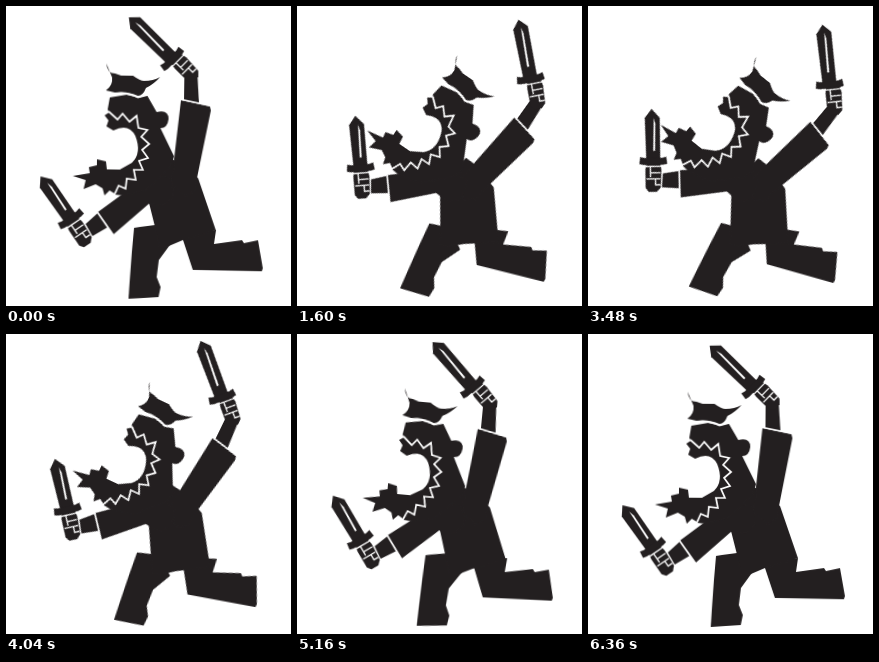
Recreate the animation shown at these times as an HTML page. Size 285x300 px, loop 6.4 s.

```html
<!DOCTYPE html>
<html lang="en">
<head>
<meta charset="utf-8">
<title>Dancing viking</title>
<style>
  html, body { margin: 0; width: 100%; height: 100%; overflow: hidden; background: #fff; }
  svg { display: block; width: 100%; height: 100%; fill: #231f20; }
  .cut { fill: none; stroke: #fff; stroke-width: 1.7; }
  .fine { stroke-width: 1.3; }
  .gap { fill: #fff; }
</style>
</head>
<body>
<svg viewBox="0 0 285 300">
  <defs>
    <!-- both are centred on the guard, blade pointing up -->
    <path id="guard" d="M-13-4L-9-3H9L13-4L14 3L10 4H-10L-14 3Z"/>
    <g id="fist">
      <path d="M-7 3H7L8 9L7 27L3 31L-5 31L-8 27L-8 9Z"/>
      <path class="cut fine" d="M-8 5.500H8M-3 6V16M-3 12H7M-7 18H7M2 18V24H7"/>
    </g>
  </defs>

  <g id="legBack">
    <path d="M175 228L187 264L256 265L257 262L252 234L238 237L236 234L208 238L210 224Z"/>
  </g>
  <g id="legFront">
    <path d="M134 221L149 219L166 236L153 254L151 271L155 281L153 291L123 293L124 276L126 246L128 222Z"/>
  </g>
  <g id="torso">
    <path d="M142 193L146 168L158 150L170 155L192 172L210 224L177 234L163 240L154 240Z"/>
  </g>

  <g id="armRight">
    <path d="M174 94L203 100L204 104L191 172L190 184L180 190L166 178L168 152Z"/>
    <path d="M177 70L190 68L192 97L177 94Z"/>
    <path class="cut" d="M172 93L205 99.500"/>
    <g transform="translate(164.500 53) rotate(-46)">
      <path d="M-1-60L7-52L7 0H-7L-8-51Z"/>
      <path class="gap" d="M0-52L1.500-46L1-12L-1-12Z"/>
      <use href="#guard"/>
      <use href="#fist" x="3"/>
    </g>
  </g>

  <g id="armLeft">
    <path d="M92 207L120 186L145 170L164 172L168 190L158 200L143 198L108 229Z"/>
    <path d="M80 219L93 207L102 222L87 231Z"/>
    <path class="cut" d="M90.500 205.500L108 230"/>
    <g transform="translate(65 214) rotate(-35)">
      <path d="M-1-52L7-43L7 0H-7L-8-43Z"/>
      <path class="gap" d="M1-43L2.500-37L2-10L0-10Z"/>
      <use href="#guard"/>
      <use href="#fist"/>
    </g>
  </g>

  <g id="head">
    <path d="M103 92L120 89L132 92L140 89L150 106Q162 103 162 113Q161 122 154 122L168 150L165 160L140 185L118 190L109 189L120 176L135 150L133 123L104 110L101 104Z"/>
    <path d="M99 58Q100 68 108 68L114 70L126 70Q133 75 137 75Q146 75 153 71Q147 78 139 82Q136 90 131 90Q120 85 108 87L99 85Q106 80 105 72Z"/>
    <path class="cut" d="M98 87.500L108 88Q120 86.500 131 91.500L141 89"/>
    <path d="M104 106L98 110L102 115L100 121L107 125Q122 117 129 130Q136 147 126 157L114 164L101 164L100 156L91 154L91 160L83 162L84 168L67 171L80 175L78 184L90 179L97 183L99 190L104 185L109 188L122 177L134 160L140 148L139 130L130 113Z"/>
    <path class="cut" d="M102 106L111 114L116 108L123 116L130 110L132 122L141 124L135 131L143 138L136 144L142 152L133 155L137 164L128 164L130 174L121 173L120 183L113 180L108 191"/>
  </g>
</svg>
<script>
// id: [pivot x, y at start, pivot x, y at end, turn in degrees]
const joints = {
  legBack: [205, 230, 205, 230, 17],
  legFront: [143, 232, 143, 232, 26],
  torso: [156, 196, 156, 196, 18],
  armRight: [183, 170, 180, 181, 45.500],
  armLeft: [155, 190, 153, 185, 38.800],
  head: [144, 153, 144, 153, 44]
};

const easing = "cubic-bezier(.25, .15, .38, 1)";
const loop = { duration: 6400, delay: -80, iterations: Infinity };

const pose = (x, y, turn, px, py) =>
  `translate(${x}px, ${y}px) rotate(${turn}deg) translate(${-px}px, ${-py}px)`;

// Both halves ease the same way, so each half carries its own easing.
for (const [id, [ax, ay, bx, by, turn]] of Object.entries(joints)) {
  const rest = { transform: pose(ax, ay, 0, ax, ay), easing };
  const raised = { transform: pose(bx, by, turn, ax, ay), easing };
  document.getElementById(id).animate([rest, raised, rest], loop);
}
</script>
</body>
</html>
```
